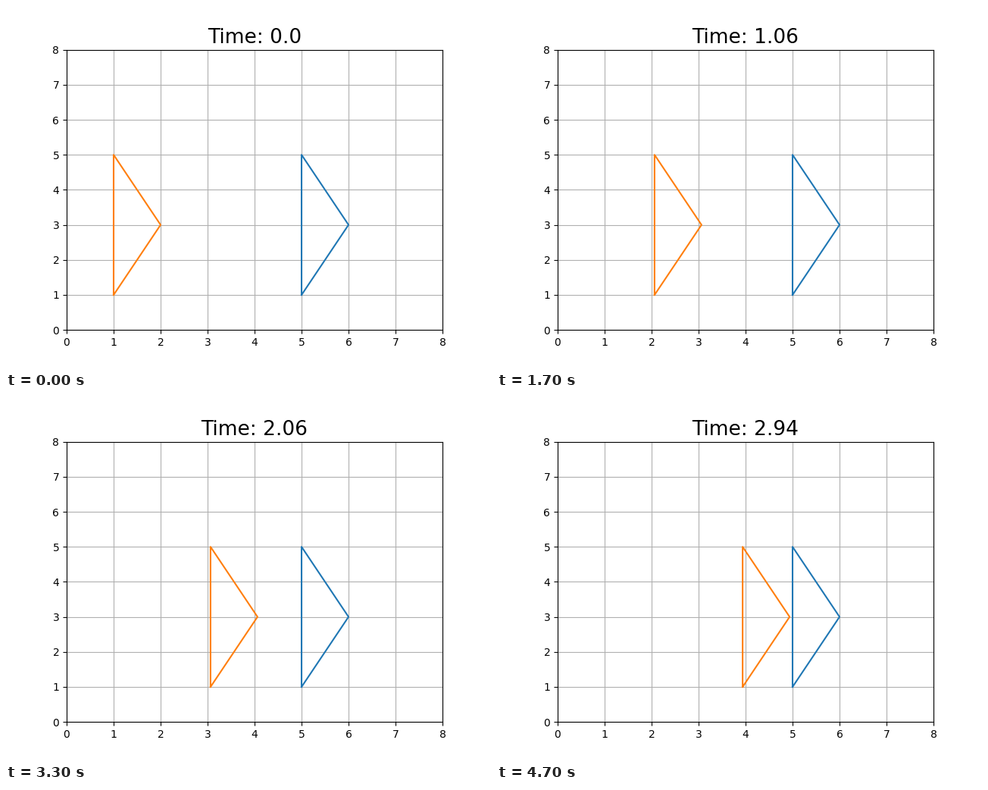
A matplotlib script for the animation above (4800 ms loop, 640 by 480 pixels).

```python
import numpy as np
import matplotlib.pyplot as plt
from matplotlib.animation import FuncAnimation

FRAMES = 48
DURATION = 3.0
SPEED = 1.0

TRI_X = np.array([0, 1, 0, 0])
TRI_Y = np.array([1, 3, 5, 1])

fig, ax = plt.subplots(figsize=(6.4, 4.8), dpi=100)
ax.set(xlim=(0, 8), ylim=(0, 8))
ax.grid(True)

ax.plot(TRI_X + 5, TRI_Y, color="C0")
mover, = ax.plot(TRI_X + 1, TRI_Y, color="C1")
title = ax.set_title("Time: 0.0", fontsize=19)


def update(i):
    t = DURATION * i / FRAMES
    mover.set_xdata(TRI_X + 1 + SPEED * t)
    title.set_text(f"Time: {round(t, 2)}")
    return mover, title


anim = FuncAnimation(fig, update, frames=FRAMES, interval=100,
                     repeat=True, repeat_delay=0)
plt.show()
```
